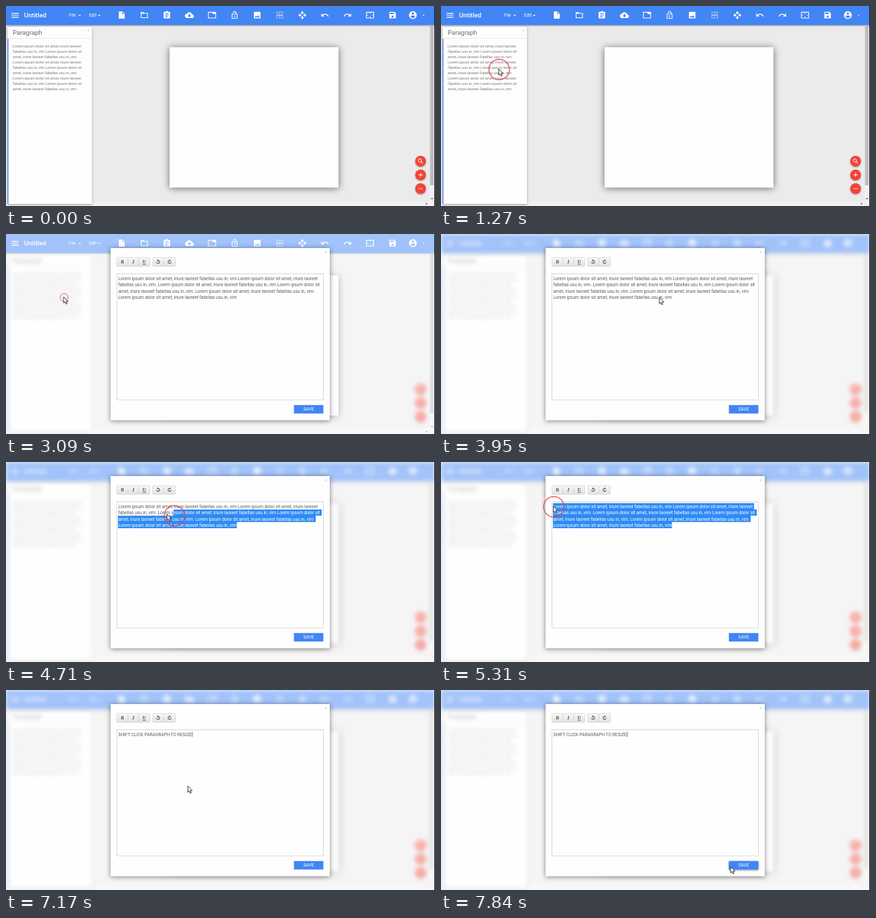
Animation, 640 px wide and 299 px high, one loop 8000 ms. Source, as an HTML page:

```html
<!DOCTYPE html>
<html lang="en">
<head>
<meta charset="utf-8">
<title>Paragraph editor</title>
<style>
html, body { margin: 0; width: 100%; height: 100%; overflow: hidden; background: #ebebeb; }
svg { display: block; width: 640px; height: 299px; font-family: Roboto, sans-serif; }
.serif { font-family: "Noto Serif", serif; font-weight: bold; font-size: 7.2px; text-anchor: middle; fill: #555; }
.small { font-size: 5.6px; fill: #7b7b7b; }
.body { font-size: 6.55px; fill: #5c5c5c; }
.white { fill: #fff; }
#sheet { filter: drop-shadow(0 1px 5.5px rgba(0,0,0,.55)); }
#panel { filter: drop-shadow(0 1px 1.5px rgba(0,0,0,.4)); }
#dialog { filter: drop-shadow(0 1.5px 3.5px rgba(0,0,0,.5)); }
.fab, .bar { filter: drop-shadow(0 1px 1.2px rgba(0,0,0,.35)); }
</style>
</head>
<body>
<svg id="stage" viewBox="0 0 640 299"></svg>
<script>
const rect = (x, y, w, h, fill, extra = '') =>
  `<rect x="${x}" y="${y}" width="${w}" height="${h}" fill="${fill}" ${extra}/>`;
const text = (x, y, str, cls, extra = '') => `<text x="${x}" y="${y}" class="${cls}" ${extra}>${str}</text>`;
const icon = (d, cx, cy, size = 13, fill = '#fff', flip = 1) =>
  `<path d="${d}" fill="${fill}" fill-rule="evenodd" transform="translate(${cx} ${cy}) scale(${size / 24 * flip} ${size / 24}) translate(-12 -12)"/>`;
const caretDown = (x, y, s = 2) => `<path d="M${x - s} ${y}h${2 * s}l${-s} ${s}z" fill="#fff"/>`;

// Icons on a 24 unit grid
const undo = 'M2 7l3.6 3.6A10.5 10.5 0 0 1 22.5 15.2l-2.4.8A8 8 0 0 0 7.4 12.4L11 16H2z';
const replay = 'M12 5V1L6 6.5l6 5.5V8a5 5 0 1 1-5 5H4a8 8 0 1 0 8-8z';
const grid = [3, 7, 11, 15, 19];
const dotted = 'M3 11h18v2H3z' + grid.flatMap(x => grid.map(y =>
  y !== 11 && (x % 8 === 3 || y % 8 === 3) ? `M${x} ${y}h2v2h-2z` : '')).join('');
const tools = [
  'M4 2h10l6 6v14H4zM13 3.5V9h5.5z',
  'M2 4h8l2 2h10v14H2zM4 8v10h16V8z',
  'M3 3h6a3 3 0 0 1 6 0h6v18H3zM7 7v2h10V7zM7 11v2h10v-2zM7 15v2h7v-2z',
  'M6 20a6 6 0 0 1-.7-12 7.5 7.5 0 0 1 14 2A5 5 0 0 1 19 20zM7 13l5 5 5-5h-3V9h-4v4z',
  'M1 3h22v18H1zM3 5v14h18V9h-8V5z',
  'M4 8h11V6a3 3 0 0 0-6 0H7a5 5 0 0 1 10 0v2h3v14H4zM6 10v10h12V10zM12 13a2 2 0 0 1 0 4 2 2 0 0 1 0-4z',
  'M3 3h18v18H3zM5 18h14l-4.5-6-3.5 4.5-2.5-3z',
  dotted,
  'M10 9h4V6h3l-5-5-5 5h3zM9 10H6V7l-5 5 5 5v-3h3zM23 12l-5-5v3h-3v4h3v3zM14 15h-4v3H7l5 5 5-5h-3z',
  undo,
  undo,
  'M1 3h22v18H1zM3 5v14h18V5zM12 5.5L10 8h4zM18 10v4l2.5-2zM6 10l-2.5 2L6 14zM10 16h4l-2 2.5z',
  'M3 3h14l4 4v14H3zM5 5v4h10V5zM12 13a3 3 0 0 1 0 6 3 3 0 0 1 0-6z'
];
const user = 'M12 2a10 10 0 0 1 0 20 10 10 0 0 1 0-20zM12 5a3 3 0 0 0 0 6 3 3 0 0 0 0-6zM6 16a7 7 0 0 0 12 0c0-4-12-4-12 0z';
const search = 'M9.5 3a6.5 6.5 0 0 1 5.2 10.4l5.8 5.6-1.5 1.5-5.6-5.8A6.5 6.5 0 1 1 9.5 3zM9.5 5a4.5 4.5 0 0 0 0 9 4.5 4.5 0 0 0 0-9z';
const fabs = [search, 'M5 11h6V5h2v6h6v2h-6v6h-2v-6H5z', 'M5 11h14v2H5z'];

// Running text
const first = 'Lorem ipsum dolor sit amet, iriure laoreet';
const second = 'fabellas usu in, vim Lorem ipsum dolor sit';
const third = 'amet, iriure laoreet fabellas usu in, vim';
const panelLines = [first, second, third + '.', first, second, third + '.', first, second, third];
const lines = [
  `${first} fabellas usu in, vim ${first}`,
  `fabellas usu in, vim. ${first} ${second}`,
  `${third}. ${first} fabellas usu in, vim`,
  `${first} fabellas usu in, vim`
];
const rowEnds = [467, 471, 462, 344.5], rowTop = 61.5, rowHeight = 9.4, left = 167;
const paragraph = lines.map((s, i) => text(167.5, 68.7 + i * rowHeight, s, '')).join('');

const button = (x, w) => rect(x, 35.3, w, 13, 'url(#shade)', 'stroke="#d0d0d0" stroke-width=".7" rx="1"');

stage.innerHTML = `
<defs>
  <linearGradient id="shade" x2="0" y2="1"><stop stop-color="#f8f8f8"/><stop offset="1" stop-color="#e2e2e2"/></linearGradient>
  <clipPath id="selected"><path class="selection"/></clipPath>
</defs>
${rect(0, 0, 640, 299, '#ebebeb')}
<g id="canvas">
  ${rect(244, 61.5, 252, 210, '#fefefe', 'id="sheet"')}
  ${rect(632, 28, 8, 271, '#f1f1f1')}${rect(0, 292, 640, 7, '#f1f1f1')}
  ${rect(632.5, 30, 5.5, 238, '#bdbdbd')}
  <path d="M633.5 287h4l-2 2.5zM626.5 293.5v4l2.5-2z" fill="#777"/>
</g>
<g id="side">
  <g id="panel">${rect(2.5, 31, 126, 265, '#fdfdfd')}</g>
  ${rect(2.5, 48, 126, .7, '#ddd')}${rect(2, 49, 1.8, 247, '#6f9ff0')}
  ${text(10, 42.8, 'Paragraph', '', 'font-size="9.6" fill="#6a6a6a"')}
  ${text(121.3, 38, '×', '', 'font-size="6" fill="#bbb"')}
  ${panelLines.map((s, i) => text(10, 62.2 + i * 8, s, 'small')).join('')}
  ${fabs.map((d, i) => `<circle class="fab" cx="618.5" cy="${232 + i * 20.5}" r="8" fill="#f44336"/>` + icon(d, 618.5, 232 + i * 20.5, 10.5)).join('')}
</g>
<g id="header">
  <g class="bar">${rect(0, 0, 640, 28.5, '#4285f4')}</g>
  ${icon('M3 6h18v2H3zM3 11h18v2H3zM3 16h18v2H3z', 13.5, 14, 14)}
  ${text(27, 17.3, 'Untitled', 'white', 'font-size="9.5" font-weight="500"')}
  ${text(94, 16.4, 'File', 'white', 'font-size="6.5"')}${caretDown(110, 13.3)}
  ${text(124, 16.4, 'Edit', 'white', 'font-size="6.5"')}${caretDown(139, 13.3)}
  ${tools.map((d, i) => icon(d, 172.7 + i * 33.67, 13.7, 13, '#fff', i === 10 ? -1 : 1)).join('')}
  ${icon(user, 607, 13.7, 14)}${caretDown(623, 13, 1.6)}
</g>
${rect(639, 0, 1, 299, '#111')}
<g id="modal">
  ${rect(0, 0, 639, 299, '#fff', 'opacity=".5"')}
  <g id="dialog">${rect(156, 21, 327, 257.5, '#fefefe')}</g>
  ${text(475.5, 29, '×', '', 'font-size="6" fill="#aaa"')}
  ${button(165.5, 16.5)}${button(182, 16)}${button(198, 16.5)}${button(219, 16.5)}${button(235.5, 17)}
  ${text(173.7, 44.3, 'B', 'serif')}
  ${text(190, 44.3, 'I', 'serif', 'font-style="italic"')}
  ${text(206.3, 44.3, 'U', 'serif', 'text-decoration="underline"')}
  ${icon(replay, 227, 41.3, 8, '#555')}${icon(replay, 244, 41.3, 8, '#555', -1)}
  ${rect(165.5, 59.5, 308, 188.5, '#fefefe', 'stroke="#d0d0d0" stroke-width=".8"')}
  <g id="before">
    <g class="body">${paragraph}</g>
    <path class="selection" fill="#2e8af5"/>
    <g class="body" style="fill:#fff" clip-path="url(#selected)">${paragraph}</g>
  </g>
  <g id="after">
    ${text(167.5, 68.7, 'SHIFT CLICK PARAGRAPH TO RESIZE', 'body')}
    ${rect(277.5, 62.5, .7, 7.5, '#333', 'id="caret"')}
  </g>
  <g id="save">${rect(429.5, 255.7, 44, 12.7, '#4285f4')}</g>
  ${text(451.5, 264.3, 'SAVE', 'white', 'font-size="6.6" text-anchor="middle"')}
</g>
<circle id="ring" fill="none" stroke="#e0474c" opacity=".85"/>
<path id="pointer" d="M0 0v9.3l2.1-1.9 1.5 3.4 1.6-.7-1.5-3.3h2.9z" fill="#fff" stroke="#222" stroke-width=".9"/>`;

const $ = id => document.getElementById(id);
const show = (id, on) => $(id).style.display = on ? '' : 'none';
const between = (t, a, b) => t >= a && t < b;

// Progress from a to b, held on n nearly evenly spaced values
const steps = (t, a, b, n) =>
  Math.min(1, Math.floor(Math.max(0, Math.min(1, (t - a) / (b - a))) * (n - 1) + .15) / (n - 1));
const smooth = p => p * p * (3 - 2 * p);
const mix = (a, b, p) => [a[0] + (b[0] - a[0]) * p, a[1] + (b[1] - a[1]) * p];
const decay = (t, power) => 1 - (1 - steps(t, 4570, 5310, 6)) ** power;

const entry = [312, 135], item = [86, 94], textEnd = [345, 95], textStart = [167.5, 66], saveEdge = [431, 263];

function pointerAt(t) {
  if (t < 3230) return mix(entry, item, smooth(steps(t, 420, 970, 5)));
  if (t < 4570) return mix(item, textEnd, smooth(steps(t, 3230, 4090, 7)));
  if (t < 6670) return mix(textEnd, textStart, decay(t, 4));
  if (t < 7840) return mix(textStart, saveEdge, smooth(steps(t, 6670, 7700, 8)));
  return [432, 264];
}

function ringRadius(t) {
  const big = [[1270, 1570], [2030, 2190], [2630, 3090], [4570, 5670]];
  const small = [[2190, 2350], [3090, 3230], [5670, 5850]];
  const inside = ([a, b]) => between(t, a, b);
  return big.some(inside) ? 15.3 : small.some(inside) ? 6 : 0;
}

function selectionPath(t, [x, y]) {
  if (t < 4570) return '';
  const row = Math.max(0, Math.floor((y - rowTop) / rowHeight));
  return rowEnds.map((end, i) => {
    const start = i === row ? Math.min(x - .5, end) : left;
    return i < row ? '' : `M${start} ${rowTop + i * rowHeight}H${end}v${rowHeight}H${start}z`;
  }).join('');
}

function draw(t) {
  const open = t >= 3090, pasted = t >= 6050, radius = ringRadius(t);
  const [x, y] = pointerAt(t);
  // The ring and selection trail the pointer while dragging
  const drag = between(t, 4570, 6050) ? mix(textEnd, textStart, decay(t, 3.4)) : [x, y];

  show('modal', open);
  show('before', !pasted);
  show('after', pasted);
  show('caret', t >= 6230);
  show('pointer', t >= 420);
  show('ring', radius);

  const blur = 'blur(3.4px)';
  $('side').style.filter = open ? blur : '';
  $('canvas').style.filter = $('header').style.filter = t >= 3230 ? blur : '';
  $('save').style.filter = t >= 7550 ? 'drop-shadow(0 1.5px 1.5px rgba(0,0,0,.45))' : '';

  const d = selectionPath(t, drag);
  document.querySelectorAll('.selection').forEach(p => p.setAttribute('d', d));
  $('pointer').setAttribute('transform', `translate(${x} ${y})`);
  $('ring').setAttribute('transform', `translate(${drag[0] + .8} ${drag[1] + 1})`);
  $('ring').setAttribute('r', radius);
  $('ring').setAttribute('stroke-width', radius > 10 ? 1.5 : 1);
}

const origin = performance.now();
(function frame() {
  draw((performance.now() - origin) % 8000);
  requestAnimationFrame(frame);
})();
</script>
</body>
</html>
```
